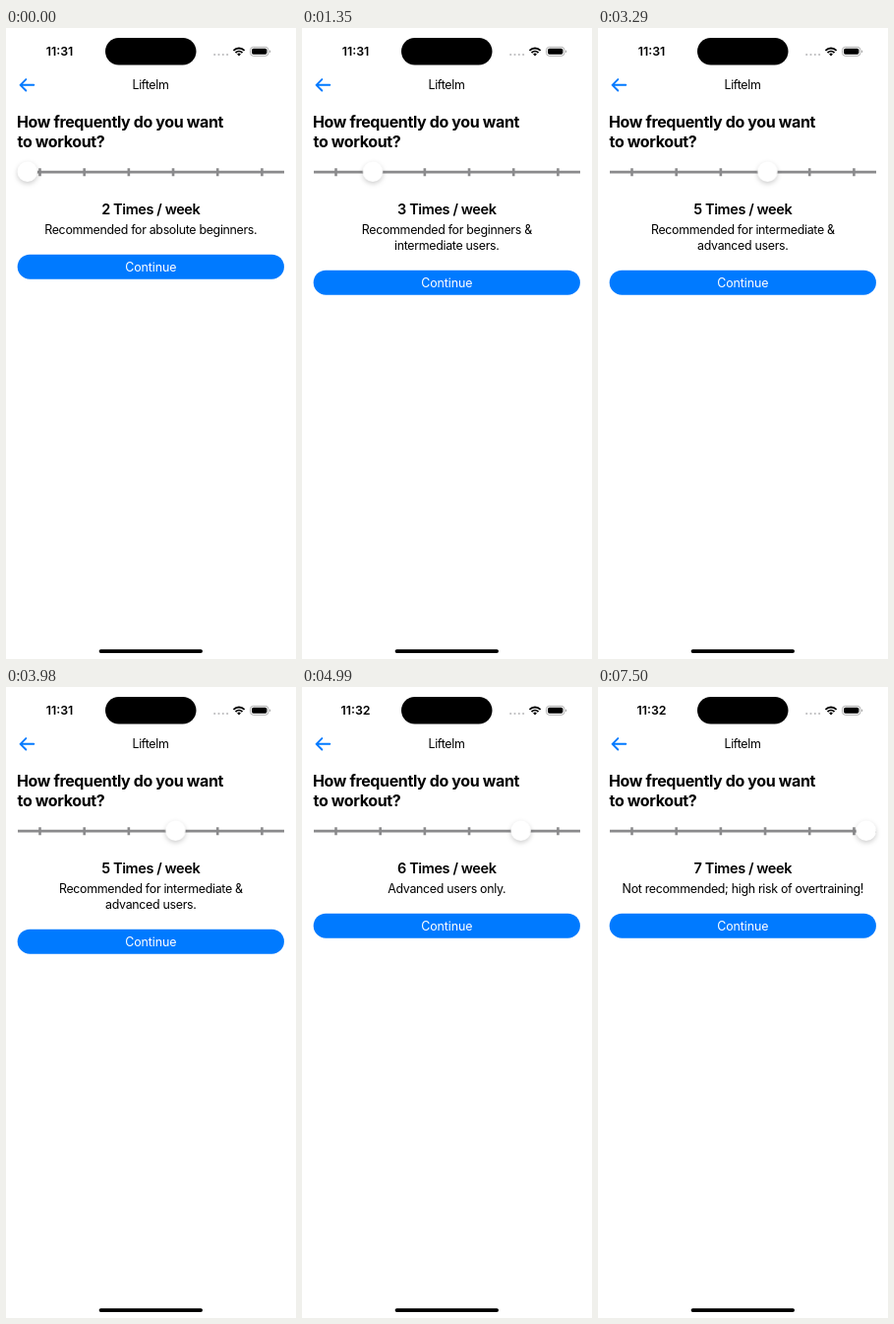
An HTML page for the animation above (8760 ms loop, 295x640 px).

```html
<!DOCTYPE html>
<html lang="en">
<head>
<meta charset="utf-8">
<title>Workout frequency</title>
<style>
html, body { margin: 0; width: 100%; height: 100%; overflow: hidden; background: #fff; }
svg { display: block; width: 295px; height: 640px; font-family: Inter, Roboto, sans-serif; }
.body { font-size: 12.4px; letter-spacing: -.31px; }
.mid { text-anchor: middle; }
.head { font-size: 16px; font-weight: 700; letter-spacing: -.37px; }
.count { font-size: 14.5px; font-weight: 600; letter-spacing: -.4px; }
.clock { font-size: 12.4px; font-weight: 600; }
.label { font-size: 12.4px; letter-spacing: -.08px; fill: #fff; }
.knob { filter: drop-shadow(0 2.5px 2.5px rgba(0, 0, 0, .2)); }

/* Every change is a hard cut within one 8.76 s loop. */
.step, .clock, .knob, .button { animation: 8.76s step-end infinite; }
.step, .late { opacity: 0; }
.two { animation-name: two; }
.three { animation-name: three; }
.four { animation-name: four; }
.five { animation-name: five; }
.six { animation-name: six; }
.seven { animation-name: seven; }
.early { animation-name: early; }
.late { animation-name: late; }
.knob { animation-name: slide; }
.button { animation-name: drop; }

@keyframes two { 0% { opacity: 1 } 15.411%, 100% { opacity: 0 } }
@keyframes three { 0% { opacity: 0 } 15.411% { opacity: 1 } 25.2283%, 100% { opacity: 0 } }
@keyframes four { 0% { opacity: 0 } 25.2283% { opacity: 1 } 37.5571%, 100% { opacity: 0 } }
@keyframes five { 0% { opacity: 0 } 37.5571% { opacity: 1 } 50.6849%, 100% { opacity: 0 } }
@keyframes six { 0% { opacity: 0 } 50.6849% { opacity: 1 } 64.1553%, 100% { opacity: 0 } }
@keyframes seven { 0% { opacity: 0 } 64.1553%, 100% { opacity: 1 } }
@keyframes early { 0% { opacity: 1 } 56.9635%, 100% { opacity: 0 } }
@keyframes late { 0% { opacity: 0 } 56.9635%, 100% { opacity: 1 } }
@keyframes slide {
  0% { transform: translateX(0) }
  15.411% { transform: translateX(50.2px) }
  25.2283% { transform: translateX(100.4px) }
  37.5571% { transform: translateX(150.6px) }
  50.6849% { transform: translateX(200.8px) }
  64.1553%, 100% { transform: translateX(251px) }
}
@keyframes drop {
  0%, 25.2283%, 50.6849%, 100% { transform: translateY(0) }
  15.411%, 37.5571% { transform: translateY(16px) }
}
</style>
</head>
<body>
<svg viewBox="0 0 295 640">
  <!-- status bar -->
  <g class="mid">
    <text class="clock early" x="54.5" y="28.3">11:31</text>
    <text class="clock late" x="54.5" y="28.3">11:32</text>
  </g>
  <rect x="101" y="10" width="92.5" height="27.5" rx="13.75"/>
  <path d="M212.2 27h14" fill="none" stroke="#bdbdbf" stroke-width="2.2" stroke-linecap="round" stroke-dasharray="0 4.3"/>
  <g fill="none" stroke="#000" stroke-width="1.8">
    <path d="M231.4 22.8a8 8 0 0 1 11.2 0M233.5 25.1a5 5 0 0 1 7 0"/>
    <path d="M237 28.4l-1.9-1.9a2.7 2.7 0 0 1 3.8 0z" fill="#000" stroke="none"/>
  </g>
  <rect x="248.5" y="19.3" width="18.4" height="9" rx="3" fill="none" stroke="#a8a8a8" stroke-width=".9"/>
  <rect x="250" y="20.8" width="15.4" height="6" rx="1.7"/>
  <path d="M268 22.3q1.2.5 1.2 1.5t-1.2 1.5z" fill="#a8a8a8"/>

  <!-- navigation -->
  <path d="M28.3 57.8H14.6M20.3 52.1l-5.7 5.7l5.7 5.7" fill="none" stroke="#007aff" stroke-width="1.9" stroke-linecap="round" stroke-linejoin="round"/>
  <text class="body mid" x="147" y="62.2">Liftelm</text>

  <text class="head" x="11" y="100.8">How frequently do you want</text>
  <text class="head" x="11.6" y="121.3">to workout?</text>

  <!-- slider -->
  <g fill="none" stroke="#8a8a8c">
    <path d="M12 146.2H283" stroke-width="2.8"/>
    <path d="M33.2 146.2H262" stroke-width="8" stroke-dasharray="2.6 42.58"/>
  </g>
  <circle class="knob" cx="21.8" cy="145.8" r="10.2" fill="#fff"/>

  <!-- choices -->
  <g class="mid">
    <g class="step two">
      <text class="count" x="147.3" y="189">2 Times / week</text>
      <text class="body" x="147.3" y="209.2">Recommended for absolute beginners.</text>
    </g>
    <g class="step three">
      <text class="count" x="147.3" y="189">3 Times / week</text>
      <text class="body" x="147.3" y="209.2">Recommended for beginners &amp;</text>
      <text class="body" x="147.3" y="225.2">intermediate users.</text>
    </g>
    <g class="step four">
      <text class="count" x="147.3" y="189">4 Times / week</text>
      <text class="body" x="147.3" y="209.2">Recommended for intermediate users.</text>
    </g>
    <g class="step five">
      <text class="count" x="147.3" y="189">5 Times / week</text>
      <text class="body" x="147.3" y="209.2">Recommended for intermediate &amp;</text>
      <text class="body" x="147.3" y="225.2">advanced users.</text>
    </g>
    <g class="step six">
      <text class="count" x="147.3" y="189">6 Times / week</text>
      <text class="body" x="147.3" y="209.2">Advanced users only.</text>
    </g>
    <g class="step seven">
      <text class="count" x="147.3" y="189">7 Times / week</text>
      <text class="body" x="147.3" y="209.2">Not recommended; high risk of overtraining!</text>
    </g>
    <g class="button">
      <rect x="11.7" y="229.7" width="271.2" height="25" rx="12.5" fill="#007aff"/>
      <text class="label" x="147.3" y="246.7">Continue</text>
    </g>
  </g>

  <rect x="94.6" y="630.2" width="105.4" height="3.8" rx="1.9"/>
</svg>
</body>
</html>
```
